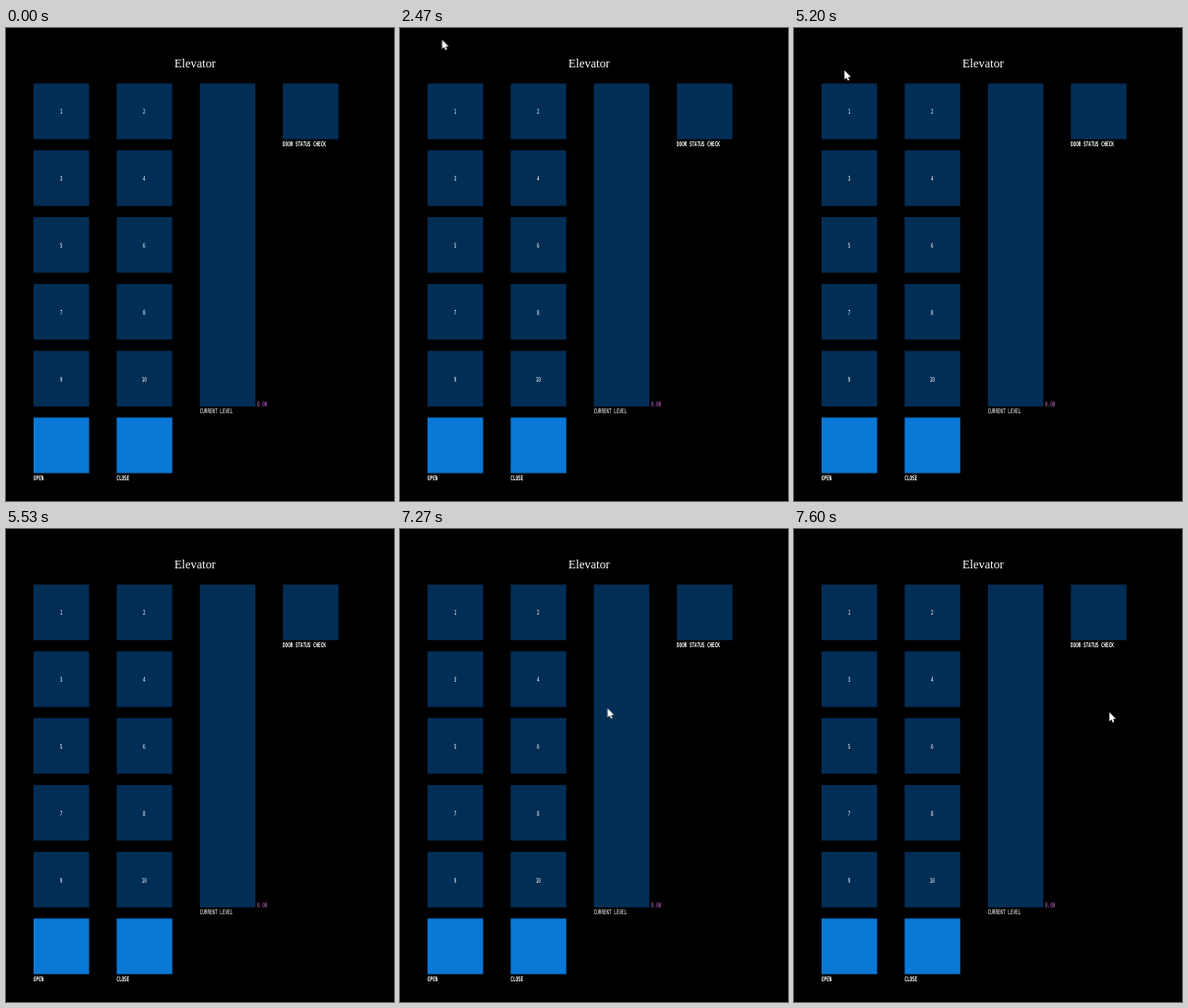
Animation of 394 by 480 pixels, one loop 8000 ms. Source, as an HTML page:

```html
<!DOCTYPE html>
<html lang="en">
<head>
<meta charset="utf-8">
<title>Elevator</title>
<style>
  html, body { margin: 0; width: 100%; height: 100%; overflow: hidden; background: #000; }
  svg { display: block; width: 394px; height: 480px; }

  .panel { fill: #022e56; }
  .action { fill: #0a78d6; }
  .title { font: 12.4px "Liberation Serif", serif; fill: #fff; text-anchor: middle; }

  /* condensed mono lettering */
  .small text {
    font: 6.6px "DejaVu Sans Mono", monospace;
    text-rendering: geometricPrecision;
    fill: #fff;
    transform: scaleX(.65);
    transform-box: fill-box;
    transform-origin: left;
  }
  .small .keys text { text-anchor: middle; transform-origin: center; }
  .small .bold { font-weight: bold; }
  .small .level { fill: #cf6ad0; }

  .arrow { fill: #fff; stroke: #000; stroke-width: .6; paint-order: stroke; }
  .arrow { animation: move 8s step-end infinite, show-arrow 8s step-end infinite; }
  .beam { fill: none; stroke: #020c18; animation: show-beam 8s step-end infinite; }

  @keyframes move {
    0%      { transform: translate(42.5px, 12px); }
    43.375% { transform: translate(104px, .5px); }
    44.125% { transform: translate(121.5px, 0); }
    65%     { transform: translate(51px, 43px); animation-timing-function: steps(5); }
    69.125% { transform: translate(76.5px, 72.5px); }
    85%     { transform: translate(126px, 136px); animation-timing-function: steps(7); }
    90.875% { transform: translate(210.5px, 182px); animation-timing-function: steps(2); }
    92.5%   { transform: translate(254px, 197px); animation-timing-function: steps(3); }
    95%, 100% { transform: translate(320px, 186px); }
  }
  @keyframes show-arrow {
    0%, 31.625%, 45%, 69.125% { opacity: 0; }
    30.875%, 43.375%, 65%, 85.875%, 100% { opacity: 1; }
  }
  @keyframes show-beam {
    0%, 85.875%, 100% { opacity: 0; }
    85% { opacity: 1; }
  }
</style>
</head>
<body>
<svg viewBox="0 0 394 480">
  <defs>
    <rect id="box" width="56.4" height="56.4"/>
    <g id="pair"><use href="#box" x="28"/><use href="#box" x="112.4"/></g>
  </defs>

  <text class="title" x="192" y="39.7">Elevator</text>

  <g class="panel">
    <use href="#pair" y="56.4"/>
    <use href="#pair" y="124.2"/>
    <use href="#pair" y="192"/>
    <use href="#pair" y="259.8"/>
    <use href="#pair" y="327.6"/>
    <rect x="196.8" y="56.4" width="56.4" height="327.6"/>
    <use href="#box" x="281.2" y="56.4"/>
  </g>
  <use class="action" href="#pair" y="395.3"/>

  <g class="small">
    <g class="keys">
      <text x="56" y="87.4">1</text><text x="140.3" y="87.4">2</text>
      <text x="56" y="155.2">3</text><text x="140.3" y="155.2">4</text>
      <text x="56" y="223">5</text><text x="140.3" y="223">6</text>
      <text x="56" y="290.8">7</text><text x="140.3" y="290.8">8</text>
      <text x="56" y="358.5">9</text><text x="140.3" y="358.5">10</text>
    </g>
    <text class="bold" x="28" y="459">OPEN</text>
    <text class="bold" x="112.3" y="459">CLOSE</text>
    <text x="196.7" y="391.3">CURRENT LEVEL</text>
    <text class="bold" x="281" y="120.3">DOOR STATUS CHECK</text>
    <text class="level" x="255" y="384.2">0.00</text>
  </g>

  <path class="beam" d="M126.5 132v8.5M125.3 132h2.4M125.3 140.5h2.4" stroke-width=".9"/>
  <path class="arrow" d="M.3 0V9.2L2.4 7.3 3.8 10.4 5.2 9.8 3.9 6.8H6.8Z"/>
</svg>
</body>
</html>
```
